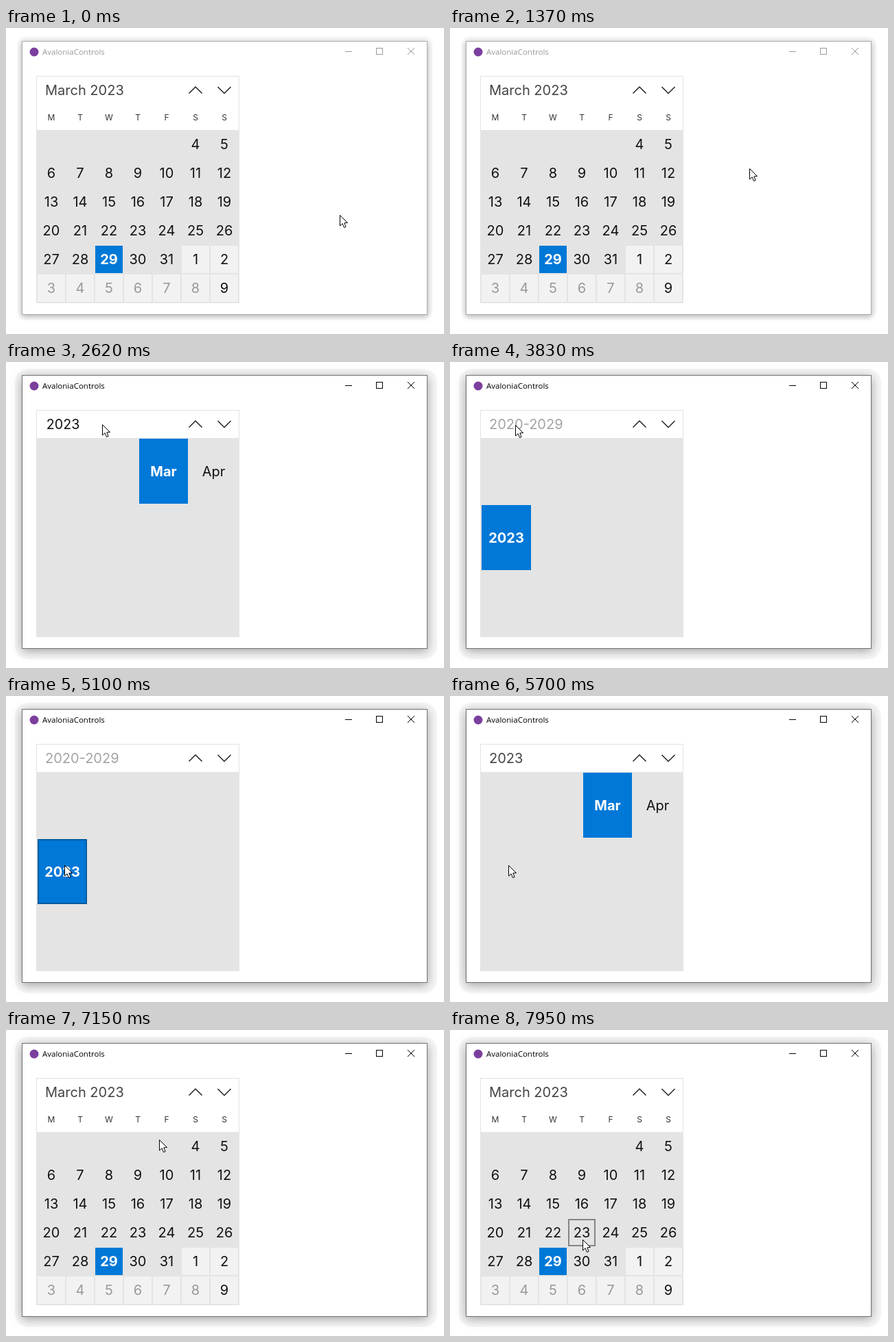
An HTML page with a canvas for the animation above (8 s loop, 638 by 447 pixels).

```html
<!DOCTYPE html>
<html lang="en">
<head>
<meta charset="utf-8">
<title>Calendar</title>
<style>
  html, body { margin: 0; width: 100%; height: 100%; overflow: hidden; background: #fff; }
  canvas { display: block; }
</style>
</head>
<body>
<canvas id="stage" width="638" height="447"></canvas>
<script>
const ctx = document.getElementById('stage').getContext('2d');
const LOOP = 8000, HOVER_LAG = 60;
const BLUE = '#0078d7', PANEL = '#e4e4e4';

const linear = p => p;
const easeOut = p => 1 - (1 - p) ** 2;
const smooth = p => p * p * (3 - 2 * p);

// Pointer moves: first step, last step, step count, destination, easing.
const START = [486, 273];
const MOVES = [
  [430, 890, 9, [448, 216], smooth],
  [1070, 1070, 1, [445, 214], linear],
  [1250, 1365, 3, [436, 205], linear],
  [1422, 1940, 10, [140, 91], smooth],
  [3170, 3400, 5, [95, 92], smooth],
  [4760, 5100, 6, [85, 247], smooth],
  [6260, 6490, 5, [200, 173], linear],
  [6548, 6720, 4, [223, 160], easeOut],
  [7710, 7950, 5, [193, 306], easeOut],
];

function pointerAt(t) {
  let from = START;
  for (const [begin, end, steps, to, ease] of MOVES) {
    if (t < begin) break;
    if (t < end) {
      const step = Math.floor((t - begin) / (end - begin) * (steps - 1) + 1e-6) + 1;
      const p = ease(step / steps);
      return from.map((v, i) => Math.round(v + (to[i] - v) * p));
    }
    from = to;
  }
  return from;
}

const within = (t, a, b) => t >= a && t < b;

function viewAt(t) {
  if (within(t, 3770, 5640)) return 'decade';
  return within(t, 2560, 7150) ? 'year' : 'month';
}

function fillRect(x, y, w, h, color) {
  ctx.fillStyle = color;
  ctx.fillRect(x, y, w, h);
}

function label(text, x, y, { size = 20, color = '#111', weight = 400, align = 'center', family = 'Inter' } = {}) {
  ctx.font = `${weight} ${size}px ${family}, sans-serif`;
  ctx.textAlign = align;
  ctx.fillStyle = color;
  ctx.fillText(text, x, y);
}

function line(points, color, width = 1) {
  ctx.beginPath();
  points.forEach(p => ctx.lineTo(...p));
  ctx.strokeStyle = color;
  ctx.lineWidth = width;
  ctx.stroke();
}

function frame(x, y, w, h, color, width) {
  ctx.strokeStyle = color;
  ctx.lineWidth = width;
  ctx.strokeRect(x + width / 2, y + width / 2, w - width, h - width);
}

function drawWindow(active) {
  const [x, y, w, h, r] = active ? [13, 10, 615, 424, 20] : [17, 12, 604, 414, 14];
  ctx.fillStyle = active ? '#f6f6f6' : '#f8f8f8';
  ctx.beginPath();
  ctx.roundRect(x, y, w, h, r);
  ctx.fill();

  ctx.save();
  ctx.shadowColor = active ? 'rgba(0,0,0,.36)' : 'rgba(0,0,0,.3)';
  ctx.shadowBlur = active ? 14 : 8;
  ctx.shadowOffsetY = active ? 3 : 2;
  fillRect(23, 19, 591, 400, '#fff');
  ctx.restore();
  frame(23, 19, 591, 400, active ? '#707070' : '#aaa', 1);

  ctx.fillStyle = '#7b3f9d';
  ctx.beginPath();
  ctx.arc(41, 35, 6.5, 0, Math.PI * 2);
  ctx.fill();

  const ink = active ? '#000' : '#999';
  label('AvaloniaControls', 53, 39, { size: 11.5, color: ink, align: 'left', family: '"Open Sans"' });
  line([[494, 34.5], [504, 34.5]], ink);
  frame(539, 29, 10, 10, ink, 1);
  line([[585, 29], [595, 39]], ink);
  line([[595, 29], [585, 39]], ink);
}

function drawHeader(text, color, pressed) {
  fillRect(44, 70, 296, 332, '#fff');
  frame(44, 70, 296, 332, '#e2e2e2', 1);
  ctx.save();
  if (pressed) {
    ctx.translate(150, 91);
    ctx.scale(.98, .98);
    ctx.translate(-150, -91);
  }
  label(text, 57, 98, { color, align: 'left' });
  ctx.restore();
  line([[266.5, 95.5], [276, 86], [285.5, 95.5]], '#222', 1.5);
  line([[308.5, 86], [318, 95.5], [327.5, 86]], '#222', 1.5);
}

function drawCell(text, x, y, w, h, pointer, { fill, selected, disabled, pressed } = {}) {
  const [px, py] = pointer;
  const hovered = !disabled && within(px, x, x + w) && within(py, y, y + h);
  if (selected || fill) fillRect(x, y, w, h, selected ? BLUE : fill);
  if (hovered) frame(x, y, w, h, selected ? (pressed ? '#003f70' : '#005a9e') : '#858585', 2);
  label(text, x + w / 2, y + Math.floor(h / 2) + 7 + (h > 50 ? 1 : 0), {
    color: selected ? '#fff' : disabled ? '#999' : '#111',
    weight: selected ? 700 : 400,
  });
}

function drawMonth(pointer) {
  fillRect(44, 149, 296, 253, PANEL);
  [...'MTWTFSS'].forEach((day, i) => label(day, 66 + 42 * i, 135, { size: 12, color: '#333' }));
  for (let i = 5; i < 42; i++) {
    const next = i > 32;
    drawCell(next ? i - 32 : i - 1, 46 + 42 * (i % 7), 150 + 42 * Math.floor(i / 7), 40, 40, pointer, {
      fill: next && '#f2f2f2',
      selected: i === 30,
      disabled: i > 34 && i < 41,
    });
  }
}

function drawYear(pointer, pressed) {
  fillRect(44, 111, 296, 291, PANEL);
  drawCell('Mar', 194, 112, 71, 95, pointer, { selected: true, pressed });
  drawCell('Apr', 267, 112, 71, 95, pointer);
}

function drawDecade(pointer, pressed) {
  fillRect(44, 111, 296, 291, PANEL);
  drawCell('2023', 46, 209, 72, 95, pointer, { selected: true, pressed });
}

function drawPointer([x, y]) {
  ctx.save();
  ctx.translate(x + .5, y + .5);
  ctx.beginPath();
  [[0, 0], [0, 15.5], [3.6, 12.2], [6, 18], [8.6, 17], [6.3, 11.3], [11, 11]].forEach(p => ctx.lineTo(...p));
  ctx.closePath();
  ctx.fillStyle = '#fff';
  ctx.fill();
  ctx.strokeStyle = '#000';
  ctx.lineWidth = 1;
  ctx.stroke();
  ctx.restore();
}

function draw(t) {
  const view = viewAt(t);
  const hover = pointerAt(Math.max(0, t - HOVER_LAG));
  const overHeader = within(hover[0], 45, 255) && within(hover[1], 71, 111);
  const headerPressed = within(t, 2390, 2670) || within(t, 3650, 3770);
  const cellPressed = within(t, 5530, 5640) || within(t, 7030, 7150);
  const titles = { month: 'March 2023', year: '2023', decade: '2020-2029' };

  fillRect(0, 0, 638, 447, '#fff');
  drawWindow(t >= 2390);
  drawHeader(titles[view], view === 'decade' ? '#a3a3a3' : overHeader ? '#111' : '#444', headerPressed);
  if (view === 'month') drawMonth(hover);
  else if (view === 'year') drawYear(hover, cellPressed);
  else drawDecade(hover, cellPressed);
  drawPointer(pointerAt(t));
}

const began = performance.now();
function tick() {
  draw((performance.now() - began) % LOOP);
  requestAnimationFrame(tick);
}
tick();
</script>
</body>
</html>
```
